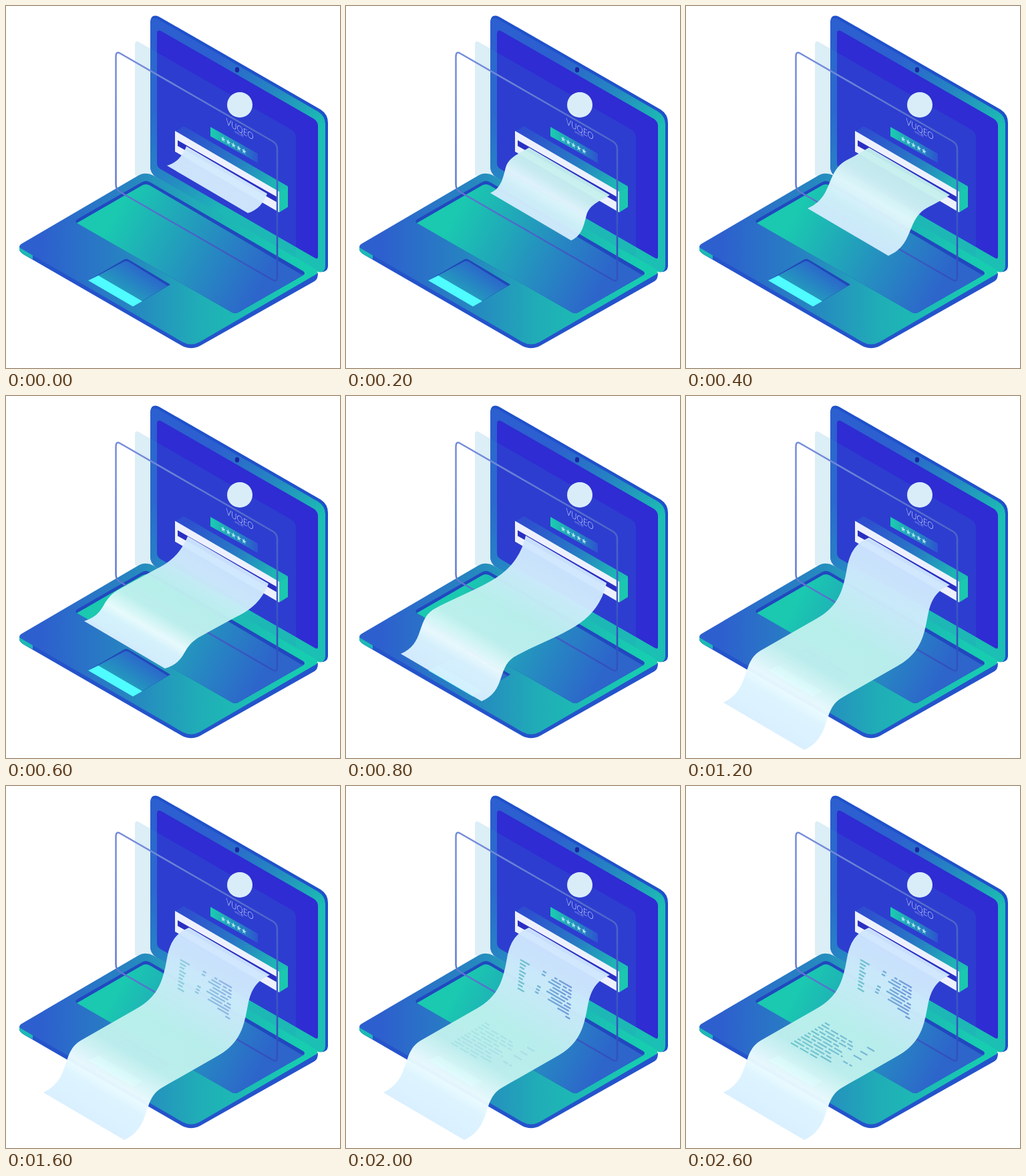
Recreate the animation shown at these times as an HTML page. Size 500 by 542 pixels, loop 2800 ms.

```html
<!DOCTYPE html>
<html lang="en">
<head>
<meta charset="utf-8">
<title>Laptop printing a receipt</title>
<style>
  html, body { margin: 0; width: 100%; height: 100%; overflow: hidden; background: #fff; }
  svg { display: block; width: 500px; height: 542px; }
</style>
</head>
<body>
<svg viewBox="0 0 500 542">
  <defs>
    <linearGradient id="bezel" gradientUnits="userSpaceOnUse" x1="330" y1="60" x2="450" y2="200">
      <stop stop-color="#2c5fcf"/><stop offset=".5" stop-color="#2584c2"/><stop offset="1" stop-color="#1bbfb3"/>
    </linearGradient>
    <linearGradient id="base" gradientUnits="userSpaceOnUse" x1="20" y1="0" x2="440" y2="0">
      <stop offset=".08" stop-color="#2d60ce"/><stop offset=".4" stop-color="#2686c0"/>
      <stop offset=".64" stop-color="#20adb7"/><stop offset="1" stop-color="#17cdb0"/>
    </linearGradient>
    <linearGradient id="keys" gradientUnits="userSpaceOnUse" x1="170" y1="300" x2="385" y2="415">
      <stop stop-color="#1ac9b0"/><stop offset="1" stop-color="#2d65cb"/>
    </linearGradient>
    <linearGradient id="pad" gradientUnits="userSpaceOnUse" x1="205" y1="395" x2="170" y2="450">
      <stop stop-color="#2b68cb"/><stop offset="1" stop-color="#1fb4b6"/>
    </linearGradient>
    <linearGradient id="glass" gradientUnits="userSpaceOnUse" x1="164" y1="120" x2="406" y2="380">
      <stop stop-color="#758cda"/><stop offset="1" stop-color="#3350bf"/>
    </linearGradient>
    <linearGradient id="lid" gradientUnits="userSpaceOnUse" x1="270" y1="185" x2="415" y2="272">
      <stop stop-color="#2d4ecf"/><stop offset=".5" stop-color="#2878c5"/><stop offset="1" stop-color="#1cc0b2"/>
    </linearGradient>
    <linearGradient id="plate" gradientUnits="userSpaceOnUse" x1="310" y1="0" x2="377" y2="0">
      <stop stop-color="#1bc9b0"/><stop offset="1" stop-color="#2c55ce"/>
    </linearGradient>
    <linearGradient id="sheet" gradientUnits="userSpaceOnUse"></linearGradient>
    <linearGradient id="inkTop" gradientUnits="userSpaceOnUse" x1="256" y1="0" x2="338" y2="0">
      <stop stop-color="#6fc5cc"/><stop offset="1" stop-color="#7297dd"/>
    </linearGradient>
    <linearGradient id="inkLow" gradientUnits="userSpaceOnUse" x1="156" y1="0" x2="285" y2="0">
      <stop stop-color="#6cc8ca"/><stop offset="1" stop-color="#7cb4d8"/>
    </linearGradient>
  </defs>

  <!-- screen -->
  <path fill="#1f51cb" d="M216 24Q217 11 229 16L471 155Q482 162 482 175V390Q481 400 468 398L226 257Q216 251 216 240Z"/>
  <path fill="url(#bezel)" d="M216 25Q217 15 228 20L467 158Q478 165 478 177V390Q477 400 468 398L226 257Q216 251 216 240Z"/>
  <path fill="#2e2cd2" d="M226 42Q226 34 233 38L461 169Q467 173 467 180V375Q467 380 462 377L231 244Q226 241 226 235Z"/>
  <ellipse cx="346" cy="95.500" rx="3.200" ry="4" fill="#1c249f"/>
  <path fill="#2896c8" opacity=".16" d="M193 56Q194 51 199 54L427 185Q434 189 434 197V391L193 253Z"/>

  <!-- base -->
  <path fill="#2453cb" d="M20 360V365Q21 369 28 373L263 508.500Q277 516 291 508.500L462 412Q467 409 467 400Z"/>
  <path fill="#1cb9b4" d="M20 361V365Q21 369 28 373L40 379V373Z"/>
  <path fill="url(#base)" d="M24 364Q16 360 25 355L196 255Q208 247 221 254L462 393Q471 399 462 403L290 503Q277 510 264 503Z"/>
  <path fill="#2148bf" d="M106 325Q102 322 107 319L203 264Q209 260 216 264L445 397Q449 400 445 403L349 458Q343 462 337 458Z"/>
  <path fill="url(#keys)" d="M106 325L203 269Q209 265 216 269L442 402L447 402L349 458Q343 462 337 458Z"/>
  <path fill="#2047ba" d="M123 411L176 380Q180 377 184 380L246 417L190 450Z"/>
  <path fill="url(#pad)" d="M137 404L176 383Q180 381 184 383L242 419L203 442Z"/>
  <path fill="#4ffcff" d="M123 411L138 403.500L204 442L190 450Z"/>

  <!-- brand and rating -->
  <circle cx="350" cy="148" r="19" fill="#d9edf9"/>
  <g fill="#d3e4fa" text-anchor="middle">
    <text transform="matrix(.866 .5 0 1 350 189)" font-family="Lato, sans-serif" font-weight="300" font-size="13.500">VUQEO</text>
    <text transform="matrix(.866 .5 0 1 349 193)" font-family="Lato, sans-serif" font-size="4" opacity=".7">WALLET</text>
  </g>
  <path fill="url(#plate)" d="M306 181L377 221V235L306 195Z"/>
  <g id="stars" fill="#a9e6ee"></g>

  <!-- printer -->
  <path fill="url(#lid)" d="M253 188L266 180L422 270L409 279Z"/>
  <path fill="#1cc7b0" d="M409 278L422 270V301L409 309Z"/>
  <path fill="#edf1fe" d="M253 187L409 278V309L253 218Z"/>
  <path fill="#2b2fc2" d="M257 201L405 285.500V293.500L257 209.500Z"/>

  <path fill="none" stroke="url(#glass)" stroke-width="2.500" d="M164.500 76Q164.500 67 171 71L400 203Q406 207 406 214V406Q406 414 399 410L170 278Q164.500 274 164.500 267Z"/>

  <path id="paper" fill="url(#sheet)" opacity=".96"/>
  <path id="textTop" fill="none" stroke="url(#inkTop)" stroke-width="2.300"/>
  <path id="textLow" fill="none" stroke="url(#inkLow)" stroke-width="2.200"/>
</svg>
<script>
const STEP = 200, LOOP = 2800;
const $ = id => document.getElementById(id);

// Left edge of the sheet at each step: start point, then cubic segments.
const edges = [
  [270, 210, 265, 223, 256, 235, 241, 239],
  [274, 212, 262, 220, 244, 225, 239, 242, 234, 262, 231, 273, 216, 280],
  [274, 212, 264, 218, 252, 225, 242, 230, 208, 247, 222, 286, 182, 303],
  [272, 210, 262, 234, 248, 248, 225, 259, 207, 269, 189, 278, 172, 288, 139, 305, 153, 325, 117, 337],
  [269, 209, 263, 236, 248, 260, 215, 278, 187, 294, 158, 304, 130, 320, 105, 337, 118, 371, 82, 386],
  [274, 212, 240, 226, 243, 257, 237, 277, 231, 303, 219, 320, 196, 333, 168, 349, 140, 365, 112, 381,
   82, 398, 98, 439, 56, 459]
];
const ACROSS = [121, 71];

const tones = {
  tip: [[0, '#d3e9fd'], [1, '#d3ebfd']],
  short: [[0, '#c4efed'], [.3, '#cdf2f1'], [.5, '#e5f9fd'], [.75, '#d3f0fa'], [1, '#d2ebfd']],
  long: [[0, '#cfe6ff'], [.2, '#d0ecfc'], [.45, '#bdf1ed'], [.64, '#c1f1ee'],
         [.79, '#effdff'], [.86, '#dcf4ff'], [1, '#d8efff']]
};

function sheetPath(edge) {
  const points = [];
  for (let i = 0; i < edge.length; i += 2) points.push([edge[i], edge[i + 1]]);
  const far = points.map(([x, y]) => [x + ACROSS[0], y + ACROSS[1]]).reverse();
  return `M${points[0]}C${points.slice(1).join(' ')}L${far[0]}C${far.slice(1).join(' ')}Z`;
}

function shadeSheet(edge, stops) {
  const [x, y] = edge, [endX, endY] = edge.slice(-2);
  const nx = -.506, ny = .862;
  const length = (endX - x) * nx + (endY - y) * ny;
  const line = { x1: x, y1: y, x2: x + nx * length, y2: y + ny * length };
  for (const key in line) $('sheet').setAttribute(key, line[key]);
  $('sheet').innerHTML = stops.map(([at, color]) => `<stop offset="${at}" stop-color="${color}"/>`).join('');
}

let seed = 11;
const random = () => (seed = seed * 16807 % 2147483647) / 2147483647;
const dash = (x, y, from, to) =>
  `M${x + from * .866} ${y + from * .5}L${x + to * .866} ${y + to * .5}`;

function dashes(x, y, from, to, longest) {
  let d = '';
  while (to - from > 3) {
    const end = Math.min(to, from + 5 + random() * longest);
    d += dash(x, y, from, end);
    from = end + 3;
  }
  return d;
}

function topText() {
  let d = '';
  for (let i = 0; i < 9; i++) d += dash(261 - i * .5, 260 + i * 5.3, 0, i ? 7 + i * 3 % 5 : 16);
  for (let i = 0; i < 10; i++) {
    const x = 338 - i * .3, y = 302 + i * 5.2;
    d += dashes(x, y, i < 8 ? -30 - i * 5 % 13 : -22 + (i - 8) * 14, 0, 38);
    if (i < 2 || i > 4 && i < 8) d += dash(x, y, -50 - i * 1.6, -44 - i * 1.6);
  }
  return d;
}

function lowText() {
  let d = '';
  for (let i = 0; i < 11; i++) {
    const x = 208 - i * 5.1, y = 354.5 + i * 3;
    d += dashes(x, y, 0, i ? 46 + i * 7 % 22 : 12, 14);
    if ([0, 2, 4, 7].includes(i)) d += dashes(x, y, 73, 88, 10);
  }
  return d;
}

$('textTop').setAttribute('d', topText());
$('textLow').setAttribute('d', lowText());
$('stars').innerHTML = [0, 1, 2, 3, 4].map(i =>
  `<text transform="matrix(.866 .5 0 1 ${325 + i * 7.8} ${203 + i * 4.5})" text-anchor="middle"
    font-family="DejaVu Sans, sans-serif" font-size="11">★</text>`).join('');

const fade = value => Math.max(0, Math.min(1, value));
let shown = -1;

function draw(now) {
  const step = Math.floor(now % LOOP / STEP);
  if (step !== shown) {
    shown = step;
    const stage = Math.min(step, edges.length - 1);
    $('paper').setAttribute('d', sheetPath(edges[stage]));
    shadeSheet(edges[stage], stage == 0 ? tones.tip : stage < 3 ? tones.short : tones.long);
    $('textTop').setAttribute('opacity', fade((step - 6) / 3));
    $('textLow').setAttribute('opacity', fade((step - 9) / 4));
  }
}

const start = performance.now();
function tick() {
  draw(performance.now() - start);
  requestAnimationFrame(tick);
}
tick();
</script>
</body>
</html>
```
